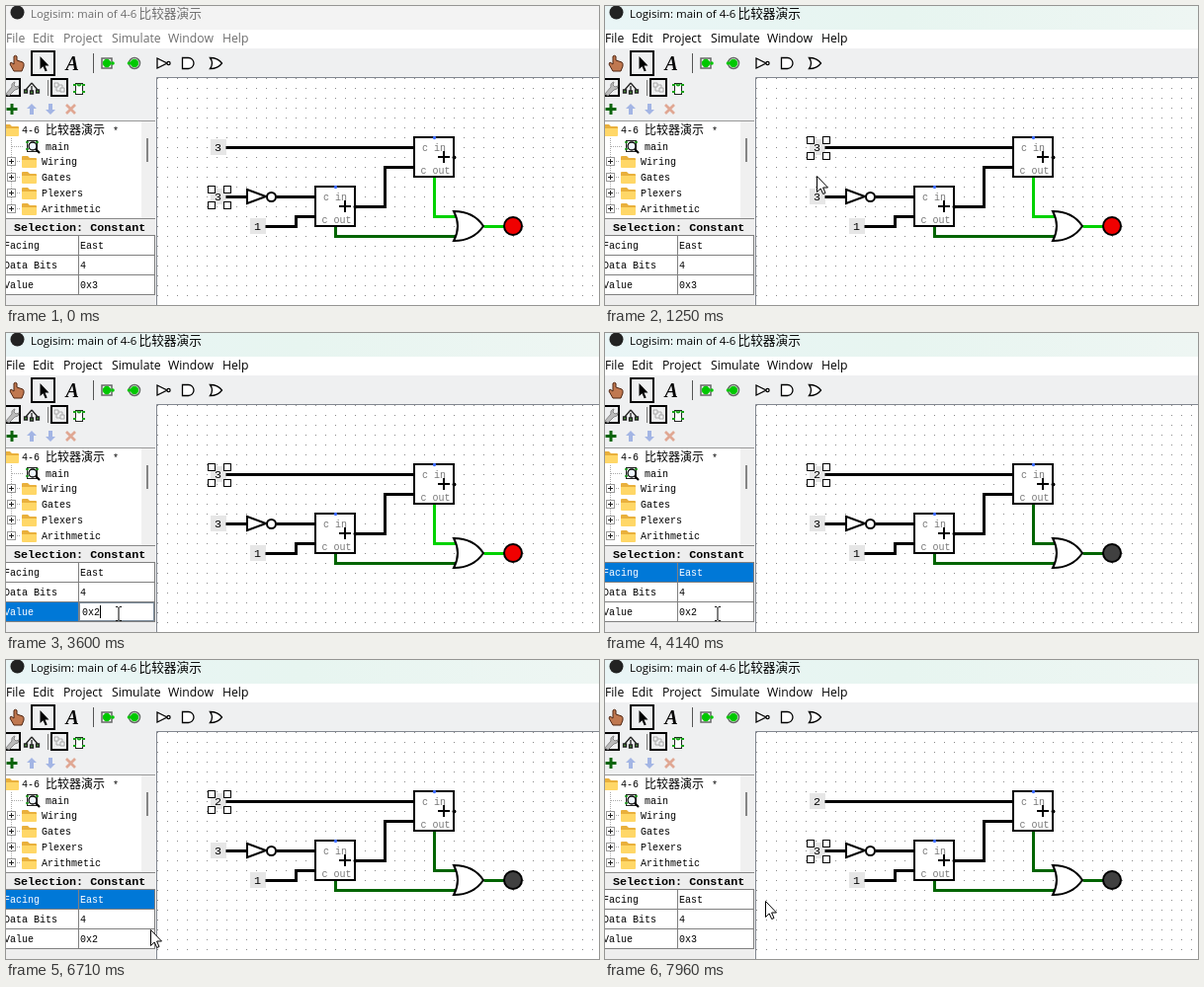
These frames come from a looping animation (600 px wide and 303 px high, 8000 ms). An HTML page:

```html
<!DOCTYPE html>
<html lang="en">
<head>
<meta charset="utf-8">
<title>Comparator circuit demo</title>
<style>
html, body { margin: 0; width: 100%; height: 100%; overflow: hidden; background: #fff; }
svg { display: block; width: 100vw; height: 100vh; }
text { white-space: pre; }
.ui { font: 12.2px "Open Sans", "Noto Sans", sans-serif; }
.cjk { font-family: "Noto Sans CJK SC", "Noto Sans CJK", "Noto Sans CJK JP", sans-serif; }
.mono { font: 10px "Liberation Mono", "Noto Sans Mono", monospace; }
.digit { font: 11.7px "Liberation Mono", monospace; }
.port { fill: #777; }
.line { fill: none; stroke: #000; stroke-width: 2; }
.body { fill: #fff; }
.wire { fill: none; stroke: #000; stroke-width: 3; }
.low { stroke: #006400; }

/* One loop is 8 s, so 1% is 80 ms. */
.ink, .inactive, .handles, .signal, .lamp, .old, .new, .three, .two,
.edit, .typed3, .typed2, .caret, .facing, .facingText, .pointer, .arrow, .beam {
  animation: 8s step-end infinite;
}
.ink { animation-name: ink; }
.inactive { animation-name: inactive; }
.handles { animation-name: handles; }
.signal { animation-name: signal; }
.lamp { animation-name: lamp; }
.old { animation-name: old; }
.new { animation-name: new; }
.three { animation-name: three; }
.two, .facing { animation-name: two; }
.facingText { animation-name: facingText; }
.edit { animation-name: edit; }
.typed3 { animation-name: typed3; }
.typed2 { animation-name: typed2; }
.caret { animation-name: caret; }
.pointer { animation-name: pointer; }
.arrow { animation-name: arrow; }
.beam { animation-name: beam; }

@keyframes ink { 0% { fill: #6e6e6e } 6.75%, 100% { fill: #000 } }
@keyframes inactive { 0% { opacity: 1 } 6.75%, 100% { opacity: 0 } }
@keyframes handles {
  0% { transform: translateY(50px) }
  7.75% { transform: translateY(0) }
  96.5%, 100% { transform: translateY(50px) }
}
@keyframes signal { 0% { stroke: #00d200 } 51.75%, 100% { stroke: #006400 } }
@keyframes lamp { 0% { fill: #f00000 } 51.75%, 100% { fill: #404040 } }
@keyframes old { 0% { opacity: 1 } 51.75%, 100% { opacity: 0 } }
@keyframes new { 0% { opacity: 0 } 51.75%, 100% { opacity: 1 } }
@keyframes three { 0% { opacity: 1 } 27.375% { opacity: 0 } 96.5%, 100% { opacity: 1 } }
@keyframes two { 0% { opacity: 0 } 51.75% { opacity: 1 } 96.5%, 100% { opacity: 0 } }
@keyframes facingText { 0% { fill: #000 } 51.75% { fill: #fff } 96.5%, 100% { fill: #000 } }
@keyframes edit { 0% { opacity: 0 } 27.375% { opacity: 1 } 51.75%, 100% { opacity: 0 } }
@keyframes typed3 { 0% { opacity: 1 } 43%, 100% { opacity: 0 } }
@keyframes typed2 { 0% { opacity: 0 } 45%, 100% { opacity: 1 } }
@keyframes caret {
  0% { opacity: 1; transform: none }
  33.25% { opacity: 0; transform: none }
  40% { opacity: 1; transform: none }
  43% { opacity: 1; transform: translateX(-6px) }
  45%, 100% { opacity: 1; transform: none }
}
@keyframes arrow { 0% { opacity: 0 } 1.875% { opacity: 1 } 29.375% { opacity: 0 } 63.375%, 100% { opacity: 1 } }
@keyframes beam { 0% { opacity: 0 } 29.375% { opacity: 1 } 63.375%, 100% { opacity: 0 } }
@keyframes pointer {
  0% { transform: translate(271px, 206px) }
  1.875% { transform: translate(271px, 206px); animation-timing-function: steps(3) }
  4.85% { transform: translate(213px, 144px) }
  15.6% { transform: translate(214px, 172px); animation-timing-function: steps(10) }
  25.45% { transform: translate(111px, 283px) }
  29.375% { transform: translate(114px, 284px) }
  63.375% { transform: translate(118px, 281px); animation-timing-function: steps(4) }
  67.2% { transform: translate(209px, 203px); animation-timing-function: steps(3) }
  70.2% { transform: translate(214px, 194px) }
  77% { transform: translate(214px, 181px); animation-timing-function: steps(2) }
  79% { transform: translate(214px, 152px); animation-timing-function: steps(5) }
  83.8% { transform: translate(146px, 273px); animation-timing-function: steps(3) }
  86.8% { transform: translate(216px, 203px) }
  88.75% { transform: translate(216px, 197px) }
  89.7% { transform: translate(217px, 191px) }
  91.75% { transform: translate(216px, 191px) }
  96.5% { transform: translate(216px, 191px); animation-timing-function: steps(3) }
  99.45%, 100% { transform: translate(162px, 244px) }
}
</style>
</head>
<body>
<svg viewBox="0 0 600 303" preserveAspectRatio="none">
  <defs>
    <linearGradient id="mica">
      <stop offset="0" stop-color="#e9f5f6"/>
      <stop offset=".5" stop-color="#e7f5f0"/>
      <stop offset="1" stop-color="#eef6f3"/>
    </linearGradient>
    <pattern id="dots" x="3" y="3" width="10" height="10" patternUnits="userSpaceOnUse">
      <rect width="1" height="1" fill="#8c8c8c"/>
    </pattern>
    <g id="folder">
      <path d="M0 2q0-1 1-1h5l2 2h6q1 0 1 1v8H0z" fill="#e9b03c"/>
      <path d="M0 5h15v7q0 1-1 1H1q-1 0-1-1z" fill="#ffd767"/>
    </g>
    <g id="branch">
      <path d="M5 7.5H15" stroke="#aaa" stroke-dasharray="1 1"/>
      <rect x="1.500" y="3.500" width="8" height="8" fill="#fff" stroke="#999"/>
      <path d="M3 7.500H8M5.500 5v5" stroke="#222"/>
      <use href="#folder" x="16" y="1"/>
    </g>
    <g id="adder">
      <rect class="line body" width="40" height="40"/>
      <path class="line" d="M24 20h12M30 14v12"/>
      <circle cx="20.500" cy="0.500" r="1.700" fill="#3c6cff"/>
      <circle cx="40.500" cy="20.500" r="2"/>
      <text class="mono port" x="8" y="14">c in</text>
      <text class="mono port" x="6.500" y="37">c out</text>
    </g>
    <rect id="constant" width="16" height="16" fill="#e6e6e6"/>
    <rect id="handle" x="-3.500" y="-3.500" width="7" height="7" fill="#fff" stroke="#000"/>
  </defs>

  <rect width="600" height="303" fill="#eff0f1"/>

  <!-- title and menu -->
  <rect width="600" height="24" fill="url(#mica)"/>
  <rect class="inactive" width="600" height="24" fill="#f3f3f3"/>
  <circle cx="11.500" cy="6.500" r="7" fill="#222"/>
  <g class="ui ink">
    <text x="25" y="11.500" style="font-size:11.45px">Logisim: main of 4-6</text>
    <text class="cjk" x="134.500" y="11.500" style="font-size:12.7px">比较器演示</text>
  </g>
  <rect y="24" width="600" height="19" fill="#fff"/>
  <g class="ui ink">
    <text x="0" y="37">File</text>
    <text x="27" y="37">Edit</text>
    <text x="58" y="37">Project</text>
    <text x="107" y="37">Simulate</text>
    <text x="164" y="37">Window</text>
    <text x="219" y="37">Help</text>
  </g>

  <!-- main toolbar -->
  <path d="M8 66l-4-7 1-2 3 2v-8q1.500-1.500 3 0v4l6 2q1.500 1 1 4l-2 5z" fill="#c07850" stroke="#4e2410"/>
  <rect class="line" x="26" y="46" width="23" height="24"/>
  <path d="M34.500 51v13l3-2.700 2.200 5 2-.9-2.200-4.800h4z"/>
  <text x="60.500" y="65" style="font:italic bold 20px 'Liberation Serif', serif">A</text>
  <path d="M88.500 48v20" stroke="#555"/>
  <g fill="#fff" stroke="#666" stroke-width="1.500">
    <rect x="97" y="53" width="10" height="10"/>
    <circle cx="130" cy="58" r="5.500"/>
  </g>
  <g fill="#00c800">
    <circle cx="102" cy="58" r="4.200"/><circle cx="108" cy="58" r="1.800"/>
    <circle cx="130" cy="58" r="4.200"/><circle cx="124.500" cy="58" r="1.800"/>
  </g>
  <g fill="#fff" stroke="#000" stroke-width="1.300">
    <path d="M153 53v10l10-5z"/><circle cx="164.500" cy="58" r="1.600"/>
    <path d="M178.500 52.500h6a5.500 5.500 0 0 1 0 11h-6z"/>
    <path d="M206.500 52.500q8 0 12 5.500q-4 5.500-12 5.500q4-5.500 0-11z"/>
  </g>

  <!-- explorer toolbars -->
  <rect class="line" x="-2" y="74" width="16" height="17"/>
  <path d="M0 89l6-7q-1-4 3-5l-1 3 2 2 3-1q0 4-4 4l-6 6z" fill="#bbb" stroke="#888"/>
  <g fill="none" stroke="#222" stroke-width="1.300">
    <path d="M26 78l-6 7M26 78l6 7M26 81v5"/>
    <path d="M18.500 85h3v3h-3zM24.500 86h3v3h-3zM30.500 85h3v3h-3z" fill="#4f9a3f"/>
  </g>
  <path d="M42.500 75v16" stroke="#777"/>
  <rect class="line" x="46" y="74" width="16" height="17"/>
  <path d="M49 78h4v4h-4zM55 83h4v4h-4zM53 80h4v3M51 82v4h4" fill="none" stroke="#aaa"/>
  <rect x="70.500" y="78.500" width="7" height="11" fill="#fff" stroke="#222"/>
  <path d="M68 80h3M68 87h3M77 80h3M77 87h3M72 79q2 3 4 0" fill="none" stroke="#16a016" stroke-width="2"/>
  <path d="M.5 104.500h11M6 99v11" stroke="#0c640c" stroke-width="3"/>
  <path d="M26 99l5 5h-3v6h-4v-6h-3zM45 110l5-5h-3v-6h-4v6h-3z" fill="#a3b5e4"/>
  <path d="M61 100l9 9M70 100l-9 9" stroke="#e0a793" stroke-width="2.700"/>

  <!-- explorer tree -->
  <rect y="116" width="151" height="99" fill="#fff"/>
  <rect x="137" y="117" width="14" height="98" fill="#f0f0f0"/>
  <path d="M0 116.500H151" stroke="#999"/>
  <use href="#folder" x="-2" y="119"/>
  <g class="mono">
    <text x="16" y="129">4-6</text>
    <text class="cjk" x="40" y="130" style="font-size:12px">比较器演示</text>
    <text x="108" y="130">*</text>
    <text x="40" y="146">main</text>
    <text x="36" y="161">Wiring</text>
    <text x="36" y="177">Gates</text>
    <text x="36" y="193">Plexers</text>
    <text x="36" y="209">Arithmetic</text>
  </g>
  <path d="M5.500 134v74M6 142.500h12" stroke="#aaa" stroke-dasharray="1 1" fill="none"/>
  <rect x="21.500" y="136.500" width="10" height="11" fill="#fff" stroke="#222"/>
  <path d="M20 138h3M20 145h3M30 138h3" stroke="#16a016" stroke-width="1.500"/>
  <circle cx="27" cy="142" r="4" fill="#eef6ff" stroke="#000" stroke-width="1.300"/>
  <path d="M30 145l4 4" stroke="#000" stroke-width="2.200"/>
  <use href="#branch" y="150"/>
  <use href="#branch" y="166"/>
  <use href="#branch" y="182"/>
  <use href="#branch" y="198"/>
  <rect x="142" y="134" width="2" height="24" fill="#858585"/>

  <!-- attribute table -->
  <rect y="215" width="151" height="88" fill="#eee"/>
  <path d="M0 215.500H151" stroke="#888"/>
  <text x="8" y="227.500" style="font:bold 11.7px 'Liberation Mono', monospace">Selection: Constant</text>
  <rect y="233" width="151" height="59" fill="#fff"/>
  <rect class="facing" y="233" width="150" height="19" fill="#0078d7"/>
  <path d="M0 232.500H151M0 252.500H151M0 272.500H151M0 292.500H151M73.500 233v60M150.500 233v60" stroke="#808080"/>
  <g class="mono">
    <g class="facingText"><text x="-2" y="246">Facing</text><text x="75" y="246">East</text></g>
    <text x="-2" y="266">Data Bits</text><text x="75" y="266">4</text>
    <text x="-2" y="286">Value</text>
    <text class="three" x="75" y="286">0x3</text>
    <text class="two" x="75" y="286">0x2</text>
    <g class="edit">
      <rect y="273" width="73" height="19" fill="#0078d7"/>
      <text x="-2" y="286" fill="#fff">Value</text>
      <rect x="74.500" y="273.500" width="75" height="18" fill="#fff" stroke="#7a8a99"/>
      <text x="77" y="286">0x</text>
      <text class="typed3" x="89" y="286">3</text>
      <text class="typed2" x="89" y="286">2</text>
      <rect class="caret" x="95" y="276" width="1" height="13"/>
    </g>
  </g>

  <!-- canvas -->
  <rect x="153" y="73" width="447" height="230" fill="#fff"/>
  <rect x="153" y="73" width="447" height="230" fill="url(#dots)"/>
  <path d="M600 72.500H152.500V303" fill="none" stroke="#828790"/>
  <use href="#constant" x="207" y="135"/>
  <use href="#constant" x="207" y="185"/>
  <use href="#constant" x="247" y="215"/>
  <g transform="translate(.5 .5)">
    <path class="wire" d="M222 143H413M222 193H244M273 193H313M262 223H293V213H313M353 203H383V163H413"/>
    <path class="wire low" d="M333 223V233H457"/>
    <path class="wire signal" d="M433 173V213H457M483 223H505"/>
  </g>
  <g class="digit">
    <text class="old" x="211" y="147">3</text>
    <text class="new" x="211" y="147">2</text>
    <text x="211" y="197">3</text>
    <text x="251" y="227">1</text>
  </g>
  <path class="line body" d="M244 186V200L263 193Z"/>
  <circle class="line body" cx="268.500" cy="193.500" r="4.500"/>
  <use href="#adder" x="313" y="183"/>
  <use href="#adder" x="413" y="133"/>
  <path class="line body" d="M483 223Q473 208 453 208Q461 223 453 238Q473 238 483 223Z"/>
  <circle class="lamp" cx="513" cy="223" r="9" stroke="#000" stroke-width="2"/>
  <g class="handles">
    <use href="#handle" x="208" y="136"/>
    <use href="#handle" x="224" y="136"/>
    <use href="#handle" x="208" y="152"/>
    <use href="#handle" x="224" y="152"/>
  </g>

  <!-- mouse pointer -->
  <g class="pointer">
    <path class="arrow" d="M.5 .5V16.500L4.200 13L6.700 18.500L9 17.500L6.600 12H11.500Z" fill="#fff" stroke="#000"/>
    <path class="beam" d="M-3 -6.500H-1L0 -5.500L1 -6.500H3M0 -5.500V6.500M-3 7.500H-1L0 6.500L1 7.500H3" fill="none" stroke="#000"/>
  </g>
</svg>
</body>
</html>
```
